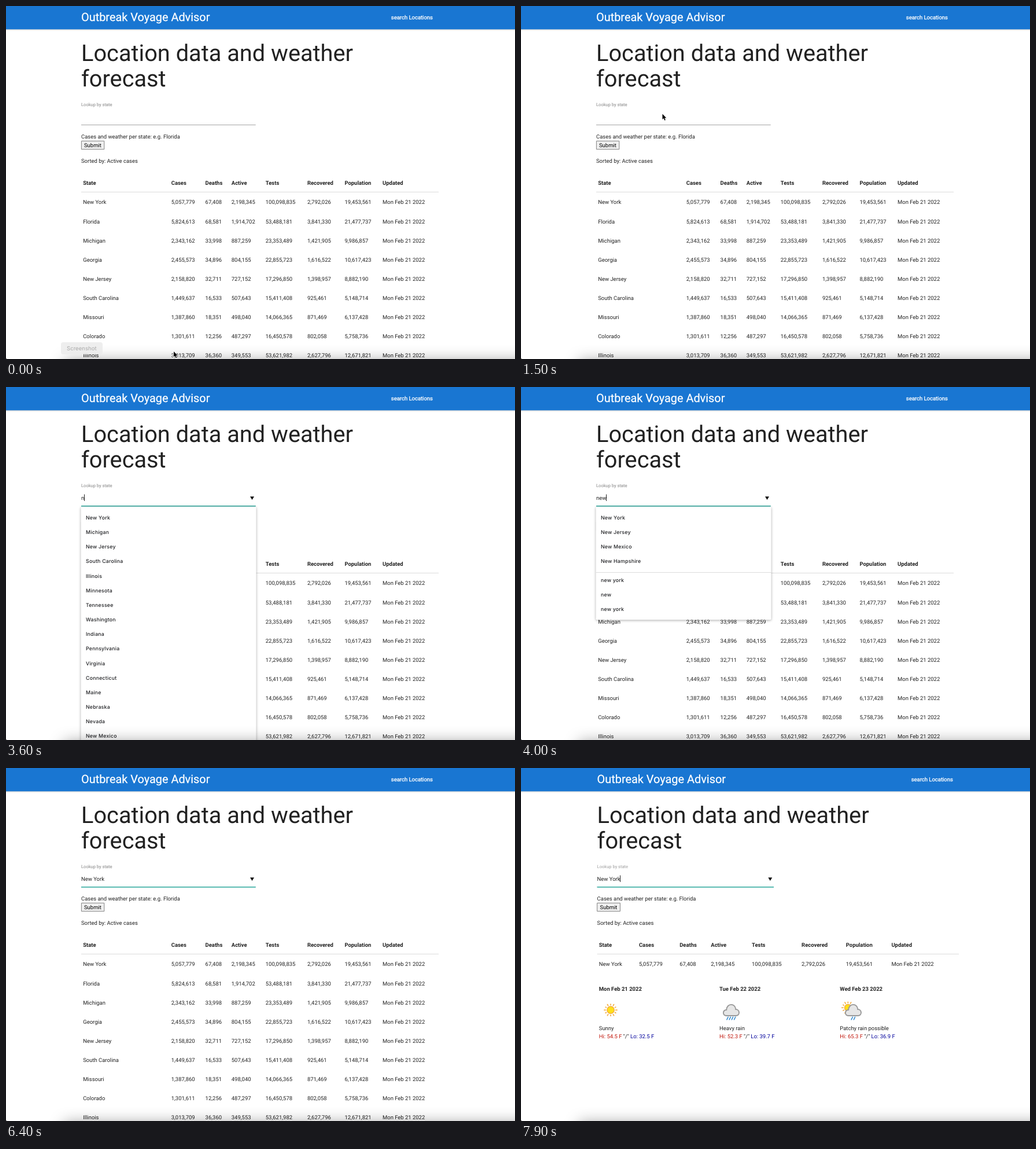
An HTML page with a canvas that plays this animation: 880x610 px, repeating every 8 s.

```html
<!DOCTYPE html>
<html lang="en">
<head>
<meta charset="utf-8">
<title>Location data and weather forecast</title>
<style>
  html, body { margin: 0; width: 100%; height: 100%; overflow: hidden; background: #fff; }
  canvas { display: block; }
</style>
</head>
<body>
<canvas id="stage" width="880" height="610"></canvas>
<script>
const ctx = document.getElementById('stage').getContext('2d');
const LOOP = 8000, STEP = 100;
const INK = 'rgba(0,0,0,.87)', BODY = 9.465;
const ROBOTO = 'Roboto, sans-serif', INTER = 'Inter, sans-serif';

const HEAD = 'State|Cases|Deaths|Active|Tests|Recovered|Population|Updated'.split('|');
const ROWS = `New York|5,057,779|67,408|2,198,345|100,098,835|2,792,026|19,453,561
Florida|5,824,613|68,581|1,914,702|53,488,181|3,841,330|21,477,737
Michigan|2,343,162|33,998|887,259|23,353,489|1,421,905|9,986,857
Georgia|2,455,573|34,896|804,155|22,855,723|1,616,522|10,617,423
New Jersey|2,158,820|32,711|727,152|17,296,850|1,398,957|8,882,190
South Carolina|1,449,637|16,533|507,643|15,411,408|925,461|5,148,714
Missouri|1,387,860|18,351|498,040|14,066,365|871,469|6,137,428
Colorado|1,301,611|12,256|487,297|16,450,578|802,058|5,758,736
Illinois|3,013,709|36,360|349,553|53,621,982|2,627,796|12,671,821`
  .split('\n').map(row => [...row.split('|'), 'Mon Feb 21 2022']);

const STATES = ('New York,Michigan,New Jersey,South Carolina,Illinois,Minnesota,Tennessee,' +
  'Washington,Indiana,Pennsylvania,Virginia,Connecticut,Maine,Nebraska,Nevada,' +
  'New Mexico,New Hampshire').split(',');
const HISTORY = ['new york', 'new', 'new york'];

const WIDE = {
  left: 131.6, field: 437, right: 757, link: 674.7,
  cols: [134.8, 203.9, 274.2, 328.3, 399, 485.1, 561.8, 640.4]
};
const NARROW = {
  left: 130, field: 431.7, right: 748, link: 665.8,
  cols: [133.2, 285.7, 344.6, 389.8, 448.8, 520.9, 585.4, 651]
};

const FORECAST = [
  { x: 134.8, day: 'Mon Feb 21 2022', sky: 'Sunny', hi: '54.5', lo: '32.5' },
  { x: 343, day: 'Tue Feb 22 2022', sky: 'Heavy rain', hi: '52.3', lo: '39.7' },
  { x: 551.3, day: 'Wed Feb 23 2022', sky: 'Patchy rain possible', hi: '65.3', lo: '36.9' }
];

const CARET_ON = [[2100, 2400], [2900, 3200], [3600, 4500], [5000, 5500],
  [5700, 6400], [6900, 7400], [7900, 8000]];
const TYPED = [[5700, 'New York'], [4000, 'new'], [3900, 'ne'], [3600, 'n'], [0, '']];

// time, x, y of the pointer
const POINTER = [[0, 290, 597], [400, 342, 605], [500, 342, 605], [600, 367, 607],
  [700, 367, 607], [1100, 318, 420], [1400, 252, 205], [1500, 244.5, 186.5], [1600, 243, 190]];

const mix = (a, b, k) => a + (b - a) * k;
const clamp = v => Math.max(0, Math.min(1, v));

function text(str, x, y, { size = BODY, weight = 400, color = INK, family = ROBOTO, spacing = 0, bold = 0 } = {}) {
  ctx.font = `${weight} ${size}px ${family}`;
  ctx.letterSpacing = spacing + 'px';
  ctx.fillStyle = color;
  ctx.fillText(str, x, y);
  if (bold) {
    ctx.strokeStyle = color;
    ctx.lineWidth = bold;
    ctx.strokeText(str, x, y);
  }
  return ctx.measureText(str).width;
}

function rect(x, y, w, h, color) {
  ctx.fillStyle = color;
  ctx.fillRect(x, y, w, h);
}

function shadowed(color, blur, dy, draw) {
  ctx.save();
  ctx.shadowColor = color;
  ctx.shadowBlur = blur;
  ctx.shadowOffsetY = dy;
  draw();
  ctx.restore();
}

function poly(points, fill) {
  ctx.beginPath();
  points.forEach(([x, y]) => ctx.lineTo(x, y));
  ctx.closePath();
  ctx.fillStyle = fill;
  ctx.fill();
}

function drawHeader(page) {
  shadowed('rgba(0,0,0,.3)', 3, 1, () => rect(-5, -5, 890, 45.3, '#1976d2'));
  text('Outbreak Voyage Advisor', page.left, 26, { size: 19.9, color: '#fff', bold: .25 });
  text('search Locations', page.link, 22.5, { color: '#fff', bold: .3 });
  text('Location data and weather', page.left, 95, { size: 39.75 });
  text('forecast', page.left, 138.7, { size: 39.75 });
}

function drawForm(page, t, typed) {
  const { left, field } = page;
  text('Lookup by state', left, 173.1, { size: 7.57, color: '#9e9e9e', bold: t < 6600 ? .2 : 0 });
  const focus = clamp((t - 1900) / 300);
  rect(left, 205, field - left, 1, '#a4a4a4');
  if (focus) {
    ctx.globalAlpha = focus;
    rect(left, 205, field - left, 1.5, '#26a69a');
    ctx.globalAlpha = 1;
  }
  const width = text(typed, left, 194.6);
  if (CARET_ON.some(([a, b]) => t >= a && t < b)) rect(Math.round(left + width - .3), 185.5, 1, 11.5, '#222');
  if (t >= 1700) {
    const x = field - 6.2;
    poly([[x - 3.5, 189.2], [x + 3.5, 189.2], [x, 195]], '#111');
  }
  text('Cases and weather per state: e.g. Florida', left, 229);
  ctx.lineWidth = .9;
  ctx.strokeStyle = '#767676';
  ctx.fillStyle = '#efefef';
  ctx.beginPath();
  ctx.rect(left + .4, 233.3, 39.4, 14.3);
  ctx.fill();
  ctx.stroke();
  text('Submit', left + 5, 243.8, { color: '#000' });
  text('Sorted by: Active cases', left, 271);
}

function drawTable(page, rows) {
  HEAD.forEach((name, i) => text(name, page.cols[i], 309, { weight: 700 }));
  rect(page.left, 321, page.right - page.left, 1, '#dcdcdc');
  rows.forEach((row, r) => row.forEach((cell, i) => text(cell, page.cols[i], 342.4 + r * 33.13)));
}

function drawMenu(typed, selected) {
  const x = 129.5, w = 303, top = 207, rowH = 25.17, pad = 6;
  const hits = STATES.filter(s => s.toLowerCase().includes(typed));
  const past = HISTORY.filter(s => s.includes(typed));
  const rule = top + pad * 2 + hits.length * rowH;
  const bottom = rule + 1 + past.length * rowH + pad;
  shadowed('rgba(0,0,0,.35)', 4, 1, () => {
    ctx.fillStyle = '#fff';
    ctx.beginPath();
    ctx.roundRect(x, top, w, bottom - top, 2);
    ctx.fill();
  });
  if (selected) rect(x, top + pad, w, rowH, '#e8e8ea');
  rect(x, Math.round(rule), w, 1, '#dcdcdc');
  const item = (str, y) =>
    text(str, 138, y + 15.9, { size: 8.8, weight: 500, family: INTER, spacing: .2, color: '#202124' });
  hits.forEach((s, i) => item(s, top + pad + i * rowH));
  past.forEach((s, i) => item(s, rule + 1 + i * rowH));
}

function drawSun(x, y, r) {
  ctx.strokeStyle = '#f2a93b';
  ctx.lineCap = 'round';
  ctx.lineWidth = 1.6;
  for (let i = 0; i < 12; i++) {
    const a = i * Math.PI / 6, far = r + (i % 2 ? 4 : 5);
    ctx.beginPath();
    ctx.moveTo(x + Math.cos(a) * (r + 2.4), y + Math.sin(a) * (r + 2.4));
    ctx.lineTo(x + Math.cos(a) * far, y + Math.sin(a) * far);
    ctx.stroke();
  }
  ctx.beginPath();
  ctx.arc(x, y, r, 0, 7);
  ctx.fillStyle = '#ffe01a';
  ctx.fill();
  ctx.lineWidth = 1.3;
  ctx.stroke();
}

function drawCloud(x, y, drops) {
  ctx.beginPath();
  ctx.moveTo(x - 8.5, y + 8);
  ctx.bezierCurveTo(x - 15, y + 7.5, x - 15, y - 1.5, x - 8, y - 2);
  ctx.bezierCurveTo(x - 7.5, y - 14, x + 7.5, y - 14, x + 8, y - 3);
  ctx.bezierCurveTo(x + 15, y - 3, x + 16, y + 7, x + 9, y + 8);
  ctx.closePath();
  ctx.fillStyle = '#e6e6e6';
  ctx.strokeStyle = '#999';
  ctx.lineWidth = 1.9;
  ctx.fill();
  ctx.stroke();
  ctx.strokeStyle = '#3d8fd0';
  ctx.lineCap = 'round';
  ctx.lineWidth = 1.6;
  for (let i = 0; i < drops; i++) {
    const dx = x + (i - (drops - 1) / 2) * 4.2;
    ctx.beginPath();
    ctx.moveTo(dx + 1.2, y + 10.3);
    ctx.lineTo(dx - 1, y + 14.8);
    ctx.stroke();
  }
}

function drawForecast() {
  for (const { x, day, sky, hi, lo } of FORECAST) {
    text(day, x, 385.2, { weight: 700 });
    text(sky, x, 452.6);
    let pen = x;
    pen += text(`Hi: ${hi} F `, pen, 467.3, { color: '#c1160b' });
    pen += text('"/" ', pen, 467.3);
    text(`Lo: ${lo} F`, pen, 467.3, { color: '#00009c' });
  }
  drawSun(155, 418.2, 6.2);
  drawCloud(363.2, 420, 4);
  drawSun(565.3, 414.2, 5.8);
  drawCloud(574.2, 420, 2);
}

function drawArrow(x, y) {
  const shape = [[0, 0], [0, 9.6], [2.2, 7.6], [3.7, 11.2], [5.3, 10.5], [3.8, 7], [6.8, 7]];
  ctx.save();
  ctx.translate(x, y);
  ctx.lineJoin = 'round';
  ctx.lineWidth = 1.6;
  ctx.strokeStyle = '#fff';
  poly(shape, '#000');
  ctx.stroke();
  poly(shape, '#000');
  ctx.restore();
}

function drawBeam(x, y) {
  ctx.lineCap = 'butt';
  for (const [color, width] of [['#fff', 2.4], ['#222', 1.1]]) {
    ctx.strokeStyle = color;
    ctx.lineWidth = width;
    ctx.beginPath();
    for (const s of [-1, 1]) {
      ctx.moveTo(x - 2.6, y + s * 5.8);
      ctx.quadraticCurveTo(x, y + s * 5.6, x, y + s * 4);
      ctx.quadraticCurveTo(x, y + s * 5.6, x + 2.6, y + s * 5.8);
    }
    ctx.moveTo(x, y - 4.5);
    ctx.lineTo(x, y + 4.5);
    ctx.moveTo(x - 1.5, y + 1.8);
    ctx.lineTo(x + 1.5, y + 1.8);
    ctx.stroke();
  }
}

function drawPointer(t) {
  if (t >= 3600) return;
  if (t >= 2700) return drawBeam(237.8, 196.3);
  if (t >= 1700) return drawBeam(240, 201.5);
  const i = Math.max(1, POINTER.findIndex(p => p[0] >= t));
  const [t0, x0, y0] = POINTER[i - 1], [t1, x1, y1] = POINTER[i];
  const k = (t - t0) / (t1 - t0);
  drawArrow(mix(x0, x1, k), mix(y0, y1, k));
}

function drawTooltip(t) {
  const alpha = clamp(1 - t / 400);
  if (!alpha) return;
  ctx.globalAlpha = alpha;
  ctx.fillStyle = 'rgba(236,236,236,.85)';
  ctx.beginPath();
  ctx.roundRect(95, 581, 72, 21, 4);
  ctx.fill();
  text('Screenshot', 105, 594.8, { size: 9.6, family: INTER, color: '#aaa' });
  ctx.globalAlpha = 1;
}

function draw(t) {
  const filtered = t >= 6600;
  const page = filtered ? WIDE : NARROW;
  const typed = TYPED.find(([from]) => t >= from)[1];
  rect(0, 0, 880, 610, '#fff');
  drawHeader(page);
  drawForm(page, t, typed);
  drawTable(page, filtered ? ROWS.slice(0, 1) : ROWS);
  if (t >= 6900) drawForecast();
  if (t >= 3600 && t < 5700) drawMenu(typed, t >= 5300);
  shadowed('rgba(0,0,0,.38)', 26, 0, () => rect(100, 613, 900, 60, '#000'));
  rect(0, 609, 1, 1, '#333');
  drawTooltip(t);
  drawPointer(t);
}

ctx.textRendering = 'geometricPrecision';
const start = performance.now();
function tick() {
  const t = (performance.now() - start) % LOOP;
  draw(Math.floor(t / STEP) * STEP);
  requestAnimationFrame(tick);
}
tick();
</script>
</body>
</html>
```
